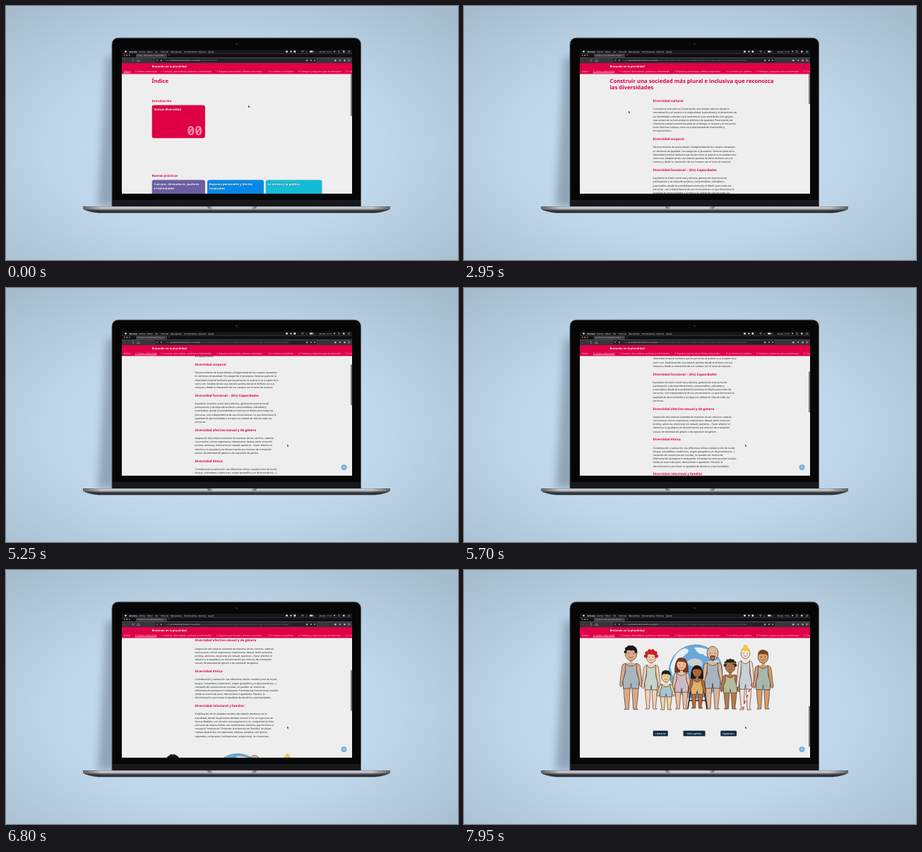
Recreate the animation shown at these times as an HTML page. Size 640 by 360 pixels, loop 8000 ms.

```html
<!DOCTYPE html>
<html lang="es">
<head>
<meta charset="utf-8">
<title>Laptop</title>
<style>
html,body{margin:0;width:100%;height:100%;overflow:hidden;background:#bdd5e9}
svg{display:block;width:100%;height:100%}
text{font-family:"Noto Sans","Open Sans",sans-serif;text-rendering:geometricPrecision;white-space:pre}
.b{font-weight:700}
.mono{font-family:"Noto Sans Mono","DejaVu Sans Mono",monospace;font-weight:700}
</style>
</head>
<body>
<svg id="stage" viewBox="0 0 640 360" xmlns="http://www.w3.org/2000/svg"></svg>
<script>
const LOOP = 8000, SWITCH = 2900, RED = '#db0045', INK = '#1c1c1e';
const stage = document.getElementById('stage');

const text = (x, y, size, str, fill = INK, cls = '', more = '') =>
  `<text x="${x}" y="${y}" font-size="${size}" fill="${fill}" class="${cls}" ${more}>${str}</text>`;
const rect = (x, y, w, h, fill, r = 0, more = '') =>
  `<rect x="${x}" y="${y}" width="${w}" height="${h}" rx="${r}" fill="${fill}" ${more}/>`;
const dot = (x, y, r, fill, more = '') => `<circle cx="${x}" cy="${y}" r="${r}" fill="${fill}" ${more}/>`;
const path = (d, fill = 'none', more = '') => `<path d="${d}" fill="${fill}" ${more}/>`;
const group = (id, body, more = '') => `<g id="${id}" ${more}>${body}</g>`;
const line = (d, color = '#222', w = .7) =>
  path(d, 'none', `stroke="${color}" stroke-width="${w}" stroke-linecap="round" stroke-linejoin="round"`);

const defs = `<defs>
  <radialGradient id="bg" cx=".48" cy=".56" r=".72"><stop offset="0" stop-color="#c8def2"/><stop offset=".5" stop-color="#c0d7eb"/><stop offset=".75" stop-color="#b3cadd"/><stop offset="1" stop-color="#a5bccd"/></radialGradient>
  <linearGradient id="base" x2="0" y2="1"><stop offset="0" stop-color="#8f9196"/><stop offset=".2" stop-color="#d4d5d9"/><stop offset=".42" stop-color="#a2a4a9"/><stop offset=".58" stop-color="#4b4c52"/><stop offset="1" stop-color="#1d1e22"/></linearGradient>
  <linearGradient id="ends"><stop offset="0" stop-color="#222" stop-opacity=".6"/><stop offset=".06" stop-color="#222" stop-opacity="0"/><stop offset=".94" stop-color="#222" stop-opacity="0"/><stop offset="1" stop-color="#222" stop-opacity=".6"/></linearGradient>
  <linearGradient id="notch"><stop offset="0" stop-color="#55565c"/><stop offset=".12" stop-color="#c9cace"/><stop offset=".88" stop-color="#c9cace"/><stop offset="1" stop-color="#55565c"/></linearGradient>
  <filter id="soft" x="-1" width="3"><feGaussianBlur stdDeviation="6"/></filter>
  <clipPath id="view"><rect x="164" y="96" width="326" height="170"/></clipPath>
  <clipPath id="screen"><rect x="164" y="62" width="326" height="204"/></clipPath>
  <clipPath id="tabClip"><rect x="185" y="67" width="38" height="6"/></clipPath>
  <clipPath id="globe"><circle cx="328" cy="144" r="38"/></clipPath>
</defs>`;

function laptop() {
  const foot = 'M109 284H544V287.4Q540 291 522 293.3H131Q113 291 109 287.4Z';
  return rect(0, 0, 640, 360, 'url(#bg)')
    + path('M130 284L142 72H158V284Z', '#526577', 'filter="url(#soft)" opacity=".45"')
    + rect(124, 288, 406, 5, '#5d7286', 2, 'filter="url(#soft)" opacity=".5"')
    + path('M150 284V55Q150 45.2 160 45.2H492.5Q502.5 45.2 502.5 55V284Z', '#060607', 'stroke="#5a5f62" stroke-width=".9"')
    + rect(151, 276, 351, 8, '#17181b') + rect(151, 275.6, 351, .6, '#34363a')
    + dot(326.5, 54, 1.3, '#202b31') + dot(326.5, 54, .5, '#4c626d')
    + path(foot, 'url(#base)') + path(foot, 'url(#ends)')
    + path('M285 284.3H355Q354 287.8 350 287.8H290Q286 287.8 285 284.3Z', 'url(#notch)');
}

function browser() {
  const menu = [[188, 'Archivo'], [200, 'Editar'], [211, 'Ver'], [219, 'Historial'], [233, 'Marcadores'],
    [252, 'Herramientas'], [272, 'Ventana'], [286, 'Ayuda']];
  const nav = [[167, 'Índice'], [183, '0. Somos diversidad'], [219, '1. Cuerpos, desnudeces, pudores e intimidades'],
    [298, '2. Espacios personales y límites corporales'], [371, '3. Lo íntimo y lo público'],
    [414, '4. Tiempos y espacios para la intimidad'], [481, '5. Cuidados']];
  return rect(164, 62, 326, 5.2, '#161618') + dot(169.5, 64.6, 1.2, '#fff')
    + text(174.5, 65.7, 2.8, 'Zorvane', '#fff', 'b')
    + menu.map(([x, s]) => text(x, 65.7, 2.85, s, '#eee')).join('')
    + rect(396, 63.4, 3, 2.4, '#ddd', .4) + dot(403.5, 64.6, 1.2, '#ddd') + rect(407.5, 63.2, 2.6, 2.8, '#eee', .4)
    + line('M418.5 64.2q1.5-1.5 3 0M419.3 65.1q.7-.6 1.4 0', '#ddd', .5)
    + text(424.5, 65.7, 2.6, '◂', '#ddd') + rect(430, 63.5, 4.4, 2.2, '#ddd', .4) + text(435, 65.7, 2.4, '%', '#ddd')
    + text(443.5, 65.7, 2.75, '29 ene  17:14', '#eee')
    + dot(465, 64.6, 1, '#ccc') + line('M470.3 63.6h2M470.3 65.4h2M485 63.8h2M484 65.4h3', '#ddd', .5) + rect(477, 63.5, 2.6, 2.3, '#ccc', .5)
    + rect(164, 67.2, 326, 6, '#0f0f13') + rect(184, 67.4, 44, 5.8, '#37373c')
    + dot(167.7, 70, .9, '#e06058') + dot(171.2, 70, .9, '#d9a840') + dot(174.7, 70, .9, '#54ad50')
    + text(185.5, 71, 2.55, '', '#e4e4e4', '', 'id="tab" clip-path="url(#tabClip)"')
    + text(224.3, 71.1, 2.9, '×', '#ccc') + text(230, 71.2, 3.4, '+', '#ddd')
    + rect(164, 73.2, 326, 7.8, '#35353a') + rect(211, 74.1, 229, 6, '#222227', .8)
    + text(166, 78.2, 3.5, '←', '#ddd') + text(173, 78.2, 3.5, '→', '#85858a')
    + line('M180.7 76a1.2 1.2 0 1 0 .5 1.4M186 77.2l1.6-1.3 1.6 1.3v1.3h-3.2z', '#ccc', .45)
    + dot(214, 77, .9, '#888') + rect(219, 76.2, 1.6, 1.8, '#aaa', .3)
    + text(225.5, 78, 2.75, '', '#85858c', '', 'id="url"')
    + rect(425, 76, 2.2, 2.2, '#aaa', .4) + dot(432, 77, 1.1, '#aaa') + dot(437, 77, 1, '#aaa')
    + rect(465, 76, 2.5, 2.2, '#bbb', .4) + dot(473, 77, 1.1, '#bbb') + rect(478.5, 76, 2.2, 2.2, '#bbb', .4)
    + line('M484.5 76h2.5M484.5 77h2.5M484.5 78h2.5', '#ddd', .4)
    + rect(164, 81, 326, 15.4, '#df0048')
    + text(206.7, 87.3, 3.85, 'Brotando en la pluralidad', '#fff', 'b')
    + nav.map(([x, s]) => text(x, 93.7, 3.25, s, '#ffdde6')).join('')
    + rect(166.5, 94.6, 9.5, .6, '#fff', 0, 'id="under"');
}

function card(x, w, color, lines) {
  return rect(x, 246.5, w, 46, color, 3)
    + lines.map((s, i) => text(x + 2.8, 254.2 + i * 5.8, 4.25, s, '#fff', 'b',
      'stroke="#2226" stroke-width=".5" paint-order="stroke"')).join('');
}

const dog = line('M336 215Q345 219 355 216M336 211Q330 216 334 220Q341 223 355 221Q358 219 354 218Q344 219 336 215', '#111', 1.6)
  + path('M347 181Q336 188 331 201Q328 211 335 214Q346 216 357 213Q364 210 358 205L362 190Z', '#161616', 'stroke="#111"')
  + path('M350 185Q345 197 351 207Q354 213 366 212Q368 209 362 207L363 188Z', '#fafafa', 'stroke="#222" stroke-width=".7"')
  + line('M353 194Q357 203 356 210M362 190Q361 200 363 206')
  + path('M343 181Q341 169 351 165Q361 162 366 170L370 177Q369 182 361 183L353 184Z', '#fafafa', 'stroke="#222" stroke-width=".8"')
  + path('M347 167Q354 161 361 167Q367 181 363 190Q357 197 355 188Q354 178 351 174Z', '#161616')
  + dot(365, 173, .7, '#111') + dot(369.2, 177, 1.3, '#111')
  + line('M345 179Q350 184 356 181', '#e1202b', 2.6) + dot(348, 184, 1.4, '#e1202b')
  + line('M334 204Q342 201 347 207Q349 212 356 211', '#333', .6);

const edge = 'stroke="#33231d" stroke-width=".6" stroke-linejoin="round"';
const toddler = path('M411 165Q420 166 421 155L419 149L423 147L428 150Q426 160 422 168Q416 175 410 174Z', '#f6c9a4', edge)
  + path('M395 167Q387 172 387 182L390 191L395 188L393 181L399 176Z', '#f6c9a4', edge)
  + path('M395 166Q392 176 392 184H416Q416 174 412 165Z', '#f6c9a4', edge)
  + path('M391 181H416Q420 196 414 211H407L404 195L401 211H394Q387 196 391 181Z', '#fafafa', edge)
  + path('M395 207h7l-1 7q-4 3-8 1zM407 206h7l2 8q-4 3-8 0z', '#ef7b27', edge)
  + path('M393 177L398 180 403 177 408 180 416 177 412 185 408 184 405 191 401 185 395 186Z', '#f27a1a')
  + path('M393 150Q392 141 403 140Q414 141 414 151Q415 163 405 167Q394 166 393 150Z', '#f6c9a4', edge)
  + path('M392 151Q390 141 398 141Q403 136 407 140Q416 140 415 150Q409 148 408 145Q401 149 396 147Z', '#f3cf45', edge)
  + dot(400, 152, .9, '#222') + dot(409, 152, .9, '#222')
  + path('M397 156Q404 159 411 155Q411 164 405 165Q399 164 397 156Z', '#9c2477', edge)
  + path('M401 162Q405 158 408 162Q405 165 401 162Z', '#f080a8')
  + line('M421 148l-2-3M423 147v-4M425 148l2-3', '#d39d79', 1.6);

function indexPage() {
  return text(206.5, 109, 7.6, 'Índice', RED, 'b') + text(206.7, 136.2, 4.3, 'Introducción', RED, 'b')
    + rect(206.7, 140.4, 75.2, 46.8, '#df0045', 3, 'id="card"')
    + rect(209, 143, 40.5, 6.8, '#271d25', .6, 'id="mark"')
    + text(209.7, 148, 4.4, 'Somos diversidad', '#fff', 'b', 'stroke="#5005" stroke-width=".5" paint-order="stroke"')
    + text(256.6, 182.6, 17.8, '00', '#fff', 'mono', 'fill-opacity=".55"')
    + text(206.7, 242, 4.3, 'Buenas prácticas', RED, 'b')
    + card(206.7, 75.2, '#6c5da6', ['Cuerpos, desnudeces, pudores', 'e intimidades'])
    + card(285, 80, '#0689e6', ['Espacios personales y límites', 'corporales'])
    + card(367.8, 79.7, '#14bcd6', ['Lo íntimo y lo público'])
    + group('friends', dog + toddler)
    + group('status', rect(164, 262.3, 46, 3.7, '#2c2c31') + text(165, 265.1, 2.3, 'pradosdelvientosereno.example/somos', '#ddd'));
}

const sections = [
  ['Diversidad cultural', 'Convivencia intercultural, fomentando una mirada inclusiva desde la|consideración y el respeto a la originalidad, la pluralidad y el dinamismo de|las identidades culturales que caracterizan a las sociedades y los grupos|que componen la humanidad en términos de igualdad. Potenciando las|relaciones interpersonales basadas en el diálogo, el respeto y el encuentro|entre distintas culturas, como una oportunidad de intercambio y|enriquecimiento.'],
  ['Diversidad corporal', 'Reconocimiento de la pluralidad y la legitimidad de los cuerpos existentes|en términos de igualdad. Sin categorías ni jerarquías. Sentirse parte de la|diversidad corporal facilitará que las personas se quieran y se acepten tal y|como son. Estableciendo una relación positiva desde el disfrute con sus|cuerpos y desde la interacción de sus cuerpos con el resto de cuerpos.'],
  ['Diversidad funcional – (Dis) Capacidades', 'Equidad e inclusión social real y efectiva, generando escenarios de|participación y de empoderamiento, comprensibles, utilizables y|practicables, desde la accesibilidad universal y el diseño para todas las|personas –con independencia de sus circunstancias. Lo que fomentará la|igualdad de oportunidades y la mejora la calidad de vida de todas las|personas.'],
  ['Diversidad afectivo-sexual y de género', 'Aceptación del universo existente de maneras de ser, sentirse, saberse,|reconocerse, vivirse, expresarse, relacionarse, desear, sentir atracción|(erótica, amorosa, emocional y/o sexual), quererse… Hacer efectivo el|derecho a la igualdad y no discriminación por motivos de orientación|sexual, de identidad de género o de expresión de género.'],
  ['Diversidad étnica', 'Consideración y valoración –las diferencias étnico-raciales (color de la piel,|lengua, costumbres, tradiciones, origen geográfico y/o de procedencia…),|resultado de construcciones sociales, no pueden ser motivo de|diferenciación jerárquica ni excluyente. Fomentar las interacciones sociales|desde un trato más justo, democrático e igualitario. Prevenir la|discriminación y promover la igualdad de derechos y oportunidades.'],
  ['Diversidad relacional y familiar', 'Visibilización de los plurales modelos de relación existentes en la|actualidad, donde las personas deciden convivir o no, se organizan de|formas flexibles, con vínculos consanguíneos o no, compartiendo fines|comunes de diversa índole, con sentimientos afectivos que les lleven a|compartir “momentos”. Entender la existencia de “familias” en plural:|nuclear-biparental, monoparental, extensa, adoptiva, sin hijos/as,|separadas, compuesta, homoparental, unipersonal, con mascotas…']
];

function article() {
  let y = 134.3, out = '';
  for (const [title, body] of sections) {
    out += text(267.6, y + 1.6, 4.5, title, RED, 'b');
    y += 11.5;
    body.split('|').forEach((s, i) => {
      if (i) y += 5.2;
      out += text(267.6, y + 1.3, 3.36, s);
    });
    y += 11.5;
  }
  return out;
}

// Flat figure in a sleeveless top and shorts
function person(x, top, foot, w, skin, hair, cloth, long) {
  const h = foot - top, r = w * .32, cy = top + r * 1.25, sh = cy + r * 1.7;
  const a = w * .5, hand = top + h * .62, hip = top + h * .54, hem = hip + h * .13;
  const limb = s => path(`M${x + s * a * .5} ${sh}Q${x + s * a} ${sh} ${x + s * a} ${sh + 5}L${x + s * (a + 3)} ${hand}q${-s * 2} 4 ${-s * 3.6} 0L${x + s * a * .6} ${sh + 9}Z`, skin, edge)
    + path(`M${x + s * .6} ${hip}H${x + s * a * .85}Q${x + s * a * .8} ${hip + h * .25} ${x + s * a * .6} ${foot - 2}l${s * 2} 2H${x + s * a * .25}Z`, skin, edge);
  return (long ? path(`M${x - r * 1.4} ${cy + r * 1.6}Q${x - r * 1.5} ${top} ${x} ${top}Q${x + r * 1.5} ${top} ${x + r * 1.4} ${cy + r * 1.6}Z`, hair) : '')
    + limb(-1) + limb(1)
    + path(`M${x - a * .75} ${sh + 1}Q${x} ${sh - 3} ${x + a * .75} ${sh + 1}V${sh + 6}H${x - a * .75}Z`, skin)
    + path(`M${x - a * .6} ${sh}Q${x} ${sh + 8} ${x + a * .6} ${sh}L${x + a * .62} ${hip - h * .12}L${x + a * .88} ${hip}L${x + a * .84} ${hem}H${x + .8}L${x} ${hip + h * .05}L${x - .8} ${hem}H${x - a * .84}L${x - a * .88} ${hip}L${x - a * .62} ${hip - h * .12}Z`, cloth, edge)
    + rect(x - 2, cy + r, 4, 5, skin)
    + `<ellipse cx="${x}" cy="${cy}" rx="${r}" ry="${r * 1.22}" fill="${skin}" ${edge}/>`
    + (hair ? path(`M${x - r} ${cy - r * .2}Q${x - r * 1.1} ${top - 1} ${x} ${top - 1}Q${x + r * 1.2} ${top} ${x + r} ${cy - r * .2}Q${x + r * .4} ${cy - r * .7} ${x} ${cy - r * .5}Q${x - r * .6} ${cy - r * .8} ${x - r} ${cy - r * .2}Z`, hair) : '')
    + dot(x - r * .4, cy, .6, '#222') + dot(x + r * .4, cy, .6, '#222')
    + line(`M${x - r * .35} ${cy + r * .55}q${r * .35} ${r * .35} ${r * .7} 0`, '#8c3333', .6);
}

function crowd() {
  const globe = `<g clip-path="url(#globe)">` + dot(328, 144, 38, '#6aa8d8')
    + path('M292 137Q300 113 313 111Q322 113 315 119Q307 123 309 132Q299 139 296 152ZM326 110Q345 108 355 121Q344 126 338 119Q332 121 326 110Z', '#e6eff5')
    + path('M314 132Q322 122 334 127Q342 134 333 139Q322 137 314 132ZM343 130l18-3 3 26q-13-1-21-23z', '#c9d0cf') + '</g>'
    + dot(328, 144, 38, 'none', 'stroke="#4b7898" stroke-width=".7"');
  const stool = line('M320 171H341M321 171L317 196M340 171L344 196M319 185H342', '#222', 1.6);
  const spots = (x, y, n, r, c) => Array.from({length: n}, (_, i) => {
    const p = Math.PI * (1 + i / (n - 1));
    return dot(x + Math.cos(p) * 7.5, y + Math.sin(p) * 7.5, r, c);
  }).join('');
  return globe
    + person(236.5, 108, 197.5, 26, '#d8aa88', '#191919', '#a9b4bd') + spots(236, 116, 6, 2, '#191919')
    + person(265, 115, 197, 21, '#f3cfb2', '#cc2027', '#c5d3ca') + spots(265, 122, 6, 2.6, '#cc2027')
    + person(352, 108, 197, 25, '#dfb595', '', '#a8b3bf') + path('M348 122q4-2 8 0q-1 7-4 7t-4-7z', '#675046') + line('M350.5 125h3', '#eed', .8)
    + person(308, 125, 197, 22, '#edbd99', '#7b3420', '#cdb9c4', true)
    + person(286, 143, 198, 20, '#eed09a', '#22201d', '#a9c3cf')
    + stool + person(330, 136, 196, 20, '#b66b36', '#171717', '#dcb06c', true)
    + person(377, 128, 197, 22, '#b8794c', '#241914', '#b3bd99') + spots(377, 135, 7, 2, '#292019') + line('M370 132h14', '#e8c867', 1.2)
    + person(398.5, 110, 198, 20, '#f5dfd1', '#edc752', '#c6d1d8') + dot(398.5, 109, 3, '#edc752')
    + line('M408 160L394 197', '#fff', 1.6) + path('M408 160L394 197', 'none', 'stroke="#dc2b38" stroke-width="1.5" stroke-dasharray="5 4"')
    + person(423.5, 114, 197, 23, '#d69b68', '#714421', '#a5b8ad');
}

function articlePage() {
  const button = (x, w, s) => rect(x, 563.8, w, 7.8, '#102b43', 1.2)
    + text(x + w / 2, 568.9, 3.05, s, '#fff', 'b', 'text-anchor="middle"');
  return text(206.5, 109.4, 7.73, 'Construir una sociedad más plural e inclusiva que reconozca', RED, 'b')
    + text(206.5, 117.8, 7.73, 'las diversidades', RED, 'b') + article()
    + `<g transform="translate(0 336)">${crowd()}</g>`
    + button(267.7, 21, '« Anterior') + button(310.5, 31, '↑ Este capítulo ↑') + button(363.3, 22.7, 'Siguiente »');
}

stage.innerHTML = defs + laptop() + `<g clip-path="url(#screen)">` + rect(164, 62, 326, 204, '#eeeeee') + browser()
  + `<g clip-path="url(#view)">` + group('home', indexPage()) + group('page', articlePage())
  + group('top', dot(478.5, 254.2, 4, '#76b4dc') + line('M477 255l1.5-1.6 1.5 1.6', '#fff', .7))
  + rect(488.2, 96, 1.5, 60, '#55565a', .7, 'id="thumb"') + '</g>'
  + group('cursor', path('M0 0V3.6L.9 2.9 1.5 4.1 2.1 3.8 1.5 2.6H2.6Z', '#111', 'stroke="#fff" stroke-width=".35"'))
  + '</g>';

const el = {};
stage.querySelectorAll('[id]').forEach(n => el[n.id] = n);
const clamp = v => Math.max(0, Math.min(1, v));
const ease = (t, a, b) => { const p = clamp((t - a) / (b - a)); return p * p * (3 - 2 * p); };
const set = (n, attrs) => { for (const k in attrs) n.setAttribute(k, attrs[k]); };
const show = (n, on) => n.setAttribute('display', on ? 'inline' : 'none');

// time, offset, speed
const scrollKeys = [[4250, 0, 0], [5250, 80, .07], [5700, 110.2, .066], [6800, 181.5, .08], [7900, 336, 0]];
function scrollAt(t) {
  if (t <= scrollKeys[0][0]) return 0;
  for (let i = 1; i < scrollKeys.length; i++) {
    const [a, y0, v0] = scrollKeys[i - 1], [b, y1, v1] = scrollKeys[i];
    if (t > b) continue;
    const d = b - a, p = (t - a) / d, q = 1 - p;
    return q * q * (1 + 2 * p) * y0 + p * p * (3 - 2 * p) * y1 + d * p * q * (q * v0 - p * v1);
  }
  return 336;
}

const host = '<tspan fill="#f0f0f0">pradosdelvientosereno.example</tspan>';
let shown = null;
function setPage(home) {
  if (shown === home) return;
  shown = home;
  show(el.home, home);
  show(el.page, !home);
  el.tab.textContent = home ? 'Índice – Brotando en la pluralidad' : 'Construir una sociedad más plural';
  el.url.innerHTML = 'www.' + host + (home ? '/indice-contenidos/'
    : '/somos-diversidad/construir-una-sociedad-mas-plural-e-inclusiva-que-reconozca-las-diversidades/');
  set(el.under, home ? {x: 166.5, width: 9.5} : {x: 182.5, width: 31});
}

function draw(t) {
  const home = t < SWITCH, s = scrollAt(t);
  const go = ease(t, 100, 1000), away = ease(t, 3050, 3900), drift = ease(t, 4300, 5200);
  const cx = 343 - 110 * go + 164 * away + drift, cy = 140.5 + 8 * go + 72 * away + drift;
  const hover = home && cx < 282;
  setPage(home);
  set(el.cursor, {transform: `translate(${cx} ${cy})`});
  set(el.card, {fill: hover ? '#b3003c' : '#df0045'});
  show(el.mark, hover);
  show(el.status, hover);
  set(el.friends, {opacity: ease(t, 560, 860)});
  set(el.page, {transform: `translate(0 ${-s})`});
  set(el.top, {opacity: clamp((s - 30) / 20)});
  set(el.thumb, {y: 96 + Math.max(0, s - 43) * .33, height: home ? 60 : 43 + 15 * clamp(s / 43)});
}

function tick(now) {
  draw(now % LOOP);
  requestAnimationFrame(tick);
}
draw(0);
requestAnimationFrame(tick);
</script>
</body>
</html>
```
